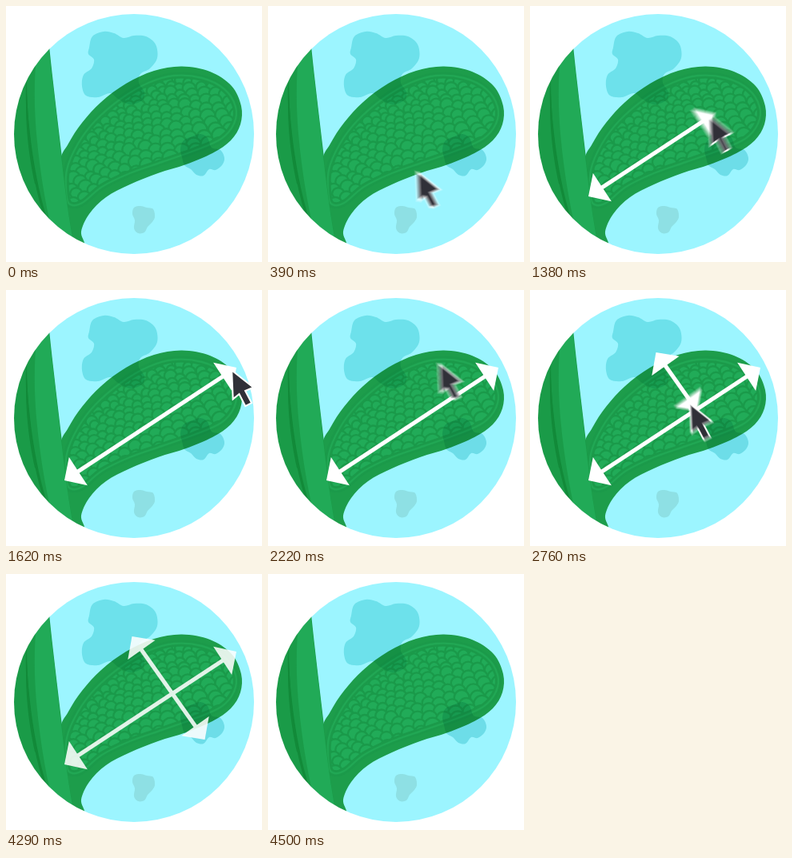
An HTML page with a canvas for the animation above (5400 ms loop, 320x320 px).

```html
<!DOCTYPE html>
<html lang="en">
<head>
<meta charset="utf-8">
<title>Measuring a pod</title>
<style>
  html, body { margin: 0; width: 100%; height: 100%; overflow: hidden; background: #fff; }
  svg, canvas { position: absolute; left: 0; top: 0; width: 100%; height: 100%; display: block; }
  .spot { mix-blend-mode: multiply; }
</style>
</head>
<body>
<svg viewBox="0 0 320 320">
  <defs>
    <clipPath id="lens"><circle cx="160" cy="160" r="150"/></clipPath>
    <clipPath id="core"></clipPath>
  </defs>
  <g id="scene" clip-path="url(#lens)">
    <rect width="320" height="320" fill="#9cf5ff"/>
    <g id="pod"></g>
    <g id="scales" clip-path="url(#core)" fill="#21ab58" stroke="#1a9a4a" stroke-width="2.4"></g>
    <g id="rim"></g>
    <g id="stem">
      <path fill="#1a9b48" d="M0 40H53C58 92 68 170 73 215S80 272 86 300H0Z"/>
      <path fill="#21aa57" d="M53 50C58 92 66 160 70 196S78 262 85 300H62C52 262 43 215 38 160C35 125 35 95 38 60Z"/>
      <path fill="#128a39" d="M25 90C27 150 35 215 52 268L47 262C34 220 23 160 25 90Z"/>
      <path fill="#128a39" d="M26 88C26 140 31 185 40 225L36 222C27 180 23 140 26 88Z"/>
    </g>
  </g>
</svg>
<canvas></canvas>
<script>
const $ = s => document.querySelector(s);

// ---------- still scene ----------
function add(parent, tag, attrs) {
  const el = document.createElementNS('http://www.w3.org/2000/svg', tag);
  for (const k in attrs) el.setAttribute(k, attrs[k]);
  $(parent).appendChild(el);
  return el;
}

// closed Catmull-Rom curve through the points
function smooth(list) {
  const p = [], n = list.length / 2;
  for (let i = 0; i < n; i++) p.push([list[2 * i], list[2 * i + 1]]);
  const at = i => p[(i + n) % n];
  let d = 'M' + p[0];
  for (let i = 0; i < n; i++) {
    const [a, b, c, e] = [at(i - 1), at(i), at(i + 1), at(i + 2)];
    d += `C${b[0] + (c[0] - a[0]) / 6} ${b[1] + (c[1] - a[1]) / 6} ` +
         `${c[0] - (e[0] - b[0]) / 6} ${c[1] - (e[1] - b[1]) / 6} ${c[0]} ${c[1]}`;
  }
  return d + 'Z';
}

const shell = smooth([68,196, 78,172, 95,146, 119,120, 150,97, 185,81, 220,75.5, 255,82,
  282,100, 294,125, 293,148, 281,168, 258,184, 225,198, 190,209, 155,223, 125,239,
  104,260, 94,282, 98,298, 86,302, 76,250]);
const core = smooth([76,240, 76,205, 90,172, 112,143, 145,115, 178,96, 210,87, 245,90,
  273,104, 287,126, 285,147, 269,166, 235,181, 195,195, 155,209, 120,226, 97,245, 83,249]);

add('#pod', 'path', { d: shell, fill: '#1d9d4b' });
add('#pod', 'path', { d: core, fill: '#1b9a4a' });
add('#core', 'path', { d: core });
add('#rim', 'path', { d: core, fill: 'none', stroke: '#1b9a4a', 'stroke-width': 8 });
add('#rim', 'path', { d: core, fill: 'none', stroke: '#21a754', 'stroke-width': 2.4 });

let seed = 11;
const rnd = () => (seed = seed * 16807 % 2147483647) / 2147483647 - 0.5;

// rows of overlapping scales along the pod, small above and large below
for (let v = -62; v < 75;) {
  const r = 6.2 + (v + 62) * 0.034;
  for (let u = 270 + rnd() * r; u > -20; u -= r * 1.75) {
    add('#scales', 'circle', {
      cx: 72 + u * 0.84 + v * 0.55 + rnd() * 2,
      cy: 238 - u * 0.55 + v * 0.84 + rnd() * 3,
      r: r + rnd() * 2
    });
  }
  v += r * 1.05;
}

function spot(fill, pts) { add('#scene', 'path', { class: 'spot', fill, d: smooth(pts) }); }
spot('#b2ebeb', [104,52, 108,38, 122,32, 135,34, 147,40, 160,37, 175,38, 187,48, 189,65,
  180,78, 168,85, 166,96, 173,108, 170,118, 155,123, 140,116, 130,109, 115,114, 100,112,
  95,100, 97,86, 107,78, 110,67, 103,60]);
spot('#b2e6e8', [218,179, 222,168, 233,163, 243,160, 252,165, 257,177, 268,180, 273,190,
  270,199, 262,205, 254,204, 247,212, 238,211, 231,204, 223,199, 220,189]);
spot('#e8eae4', [160,252, 168,250, 176,252, 184,254, 186,264, 182,271, 177,276, 173,283,
  165,284, 160,278, 161,268, 158,260]);

// ---------- arrows and pointer ----------
const LOOP = 5400, HEAD = 20.7, SAMPLES = 8, SHUTTER = 15;
const clamp = x => Math.max(0, Math.min(1, x));
const part = (t, a, b) => clamp((t - a) / (b - a));
const ease = x => (1 - Math.cos(Math.PI * x)) / 2;
const mix = (a, b, k) => [a[0] + (b[0] - a[0]) * k, a[1] + (b[1] - a[1]) * k];

function makeArrow(a, b, times) {
  const dx = b[0] - a[0], dy = b[1] - a[1], size = Math.hypot(dx, dy);
  const dir = [dx / size, dy / size];
  return {
    ...times, dir, size,
    at: d => [a[0] + dir[0] * d, a[1] + dir[1] * d],
    reach(t) { return HEAD + (size - HEAD) * ease(part(t, this.go, this.end)); },
    grip(t) {
      const p = this.at(this.reach(t) - this.back);
      return [p[0] + this.off[0], p[1] + this.off[1]];
    }
  };
}

const long = makeArrow([73, 238], [288, 97],
  { pop: 780, pop2: 850, go: 960, end: 1620, back: 7, off: [-0.5, -2.5] });
const wide = makeArrow([157.5, 78], [248.5, 207],
  { pop: 2380, pop2: 2520, go: 2490, end: 3030, back: 13, off: [-2, 0] });

function head(g, tip, [x, y], s) {
  if (s <= 0) return;
  const h = HEAD / 2 * s, w = 21 * s;
  const c = [tip[0] - x * HEAD / 2, tip[1] - y * HEAD / 2];
  g.beginPath();
  g.moveTo(c[0] + x * h, c[1] + y * h);
  g.lineTo(c[0] - x * h - y * w, c[1] - y * h + x * w);
  g.lineTo(c[0] - x * h + y * w, c[1] - y * h - x * w);
  g.fill();
}

function drawArrow(g, a, t) {
  if (t < a.pop) return;
  const d = a.reach(t), [x, y] = a.dir;
  g.fillStyle = g.strokeStyle = '#fff';
  g.lineWidth = 5;
  head(g, a.at(0), [-x, -y], part(t, a.pop, a.pop + 100));
  head(g, a.at(d), [x, y], part(t, a.pop2, a.pop2 + 100));
  if (d > HEAD * 1.4) {
    g.beginPath();
    g.moveTo(...a.at(14));
    g.lineTo(...a.at(d - 14));
    g.stroke();
  }
}

function pointerAt(t) {
  if (t < 900) {
    const k = ease(part(t, 105, 705)), a = [274, 249], c = [180, 171], b = long.grip(0);
    return mix(mix(a, c, k), mix(c, b, k), k);
  }
  if (t < 1800) return long.grip(t);
  if (t < 2400) return mix(long.grip(t), wide.grip(0), ease(part(t, 2025, 2390)));
  return mix(wide.grip(t), [257, 221], part(t, 3020, 3215));
}

const arrowShape = new Path2D('M1.6 4.2L3 36L10.2 30.2L18 45.4L24 42.4L16 27.2L25.6 23.2Z');

function drawPointer(g, t) {
  const alpha = part(t, 105, 210) * (1 - part(t, 3110, 3230));
  if (!alpha) return;
  g.save();
  g.globalAlpha = alpha;
  g.translate(...pointerAt(t));
  g.strokeStyle = '#fff';
  g.lineWidth = 4;
  g.stroke(arrowShape);
  g.fillStyle = '#2d2f31';
  g.fill(arrowShape);
  g.restore();
}

// ---------- motion-blurred playback ----------
const view = $('canvas'), layer = document.createElement('canvas');
const out = view.getContext('2d'), g = layer.getContext('2d');
const ratio = Math.max(1, window.devicePixelRatio || 1);
for (const c of [view, layer]) c.width = c.height = Math.round(320 * ratio);
g.scale(ratio, ratio);
out.globalCompositeOperation = 'lighter';
out.globalAlpha = 1 / SAMPLES;

function frame() {
  const now = performance.now() % LOOP;
  out.clearRect(0, 0, view.width, view.height);
  for (let i = 0; i < SAMPLES; i++) {
    const t = now + ((i + 0.5) / SAMPLES - 0.5) * SHUTTER;
    g.clearRect(0, 0, 320, 320);
    drawArrow(g, long, t);
    drawArrow(g, wide, t);
    drawPointer(g, t);
    out.drawImage(layer, 0, 0);
  }
  view.style.opacity = 1 - part(now, 4260, 4500);
  requestAnimationFrame(frame);
}
frame();
</script>
</body>
</html>
```
